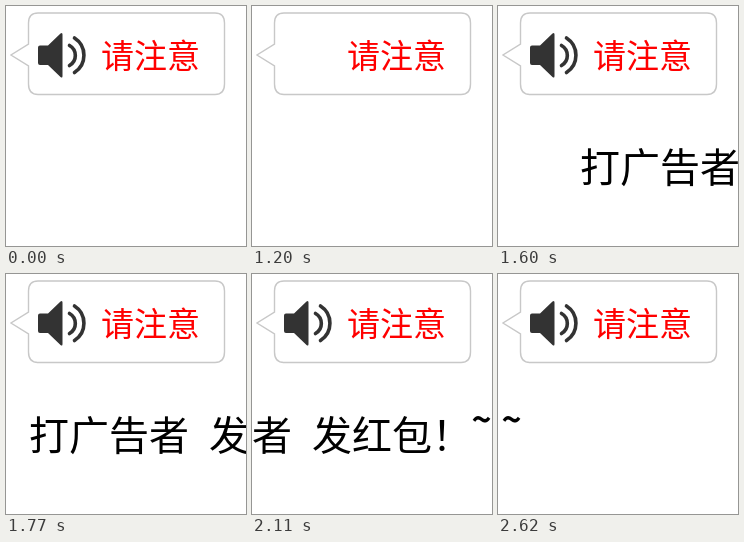
These frames come from a looping animation (240x240 px, 2790 ms). An HTML page:

```html
<!DOCTYPE html>
<html lang="zh-CN">
<head>
<meta charset="utf-8">
<style>
  html, body { margin: 0; width: 100%; height: 100%; overflow: hidden; background: #fff; }
  svg { display: block; width: 100vw; height: 100vh; }
  text { font-family: "Noto Sans CJK SC", "Noto Sans CJK", sans-serif; }
</style>
</head>
<body>
<svg viewBox="0 0 240 240">
  <path d="M32 7H209Q218.500 7 218.500 17V78Q218.500 88.500 209 88.500H32Q22.500 88.500 22.500 78V60L5 49L22.500 38V17Q22.500 7 32 7Z"
        fill="#fff" stroke="#c8c8c8" stroke-width="1.400"/>
  <g id="speaker" fill="none" stroke="#333" stroke-width="3.600" stroke-linecap="round">
    <path d="M34 39.500H42L54.500 27.500Q56.500 26 56.500 28.500V70Q56.500 72.500 54.500 71L42 59H34Q32 59 32 57V41.500Q32 39.500 34 39.500Z"
          fill="#333" stroke="none"/>
    <path d="M63.500 39.500A11.500 11.500 0 0 1 63.500 59.500"/>
    <path d="M68.500 32A20.500 20.500 0 0 1 68.500 66.500"/>
  </g>
  <text x="95" y="62" font-size="33" fill="#f00">请注意</text>
  <g id="message" font-size="40">
    <text y="175.500">打广告者<tspan x="180">发红包！</tspan></text>
    <text x="339.500" y="158" font-size="34" font-weight="700">~</text>
  </g>
</svg>
<script>
  const LOOP = 2790, STEP = 170;
  const SCROLL_START = 1500, SCROLL_NEXT = 1600;
  const scrollX = [158, 82, 23, -59, -120, -181, -260, -336];
  const speaker = document.getElementById('speaker');
  const message = document.getElementById('message');

  function show(element, visible) {
    element.setAttribute('visibility', visible ? 'visible' : 'hidden');
  }

  function draw() {
    const t = performance.now() % LOOP;
    const blink = Math.floor((t - 1000) / 100);
    show(speaker, blink !== 0 && blink !== 2);

    show(message, t >= SCROLL_START);
    const step = t < SCROLL_NEXT ? 0 : 1 + Math.floor((t - SCROLL_NEXT) / STEP);
    message.setAttribute('transform', `translate(${scrollX[step]} 0)`);
    requestAnimationFrame(draw);
  }
  draw();
</script>
</body>
</html>
```
